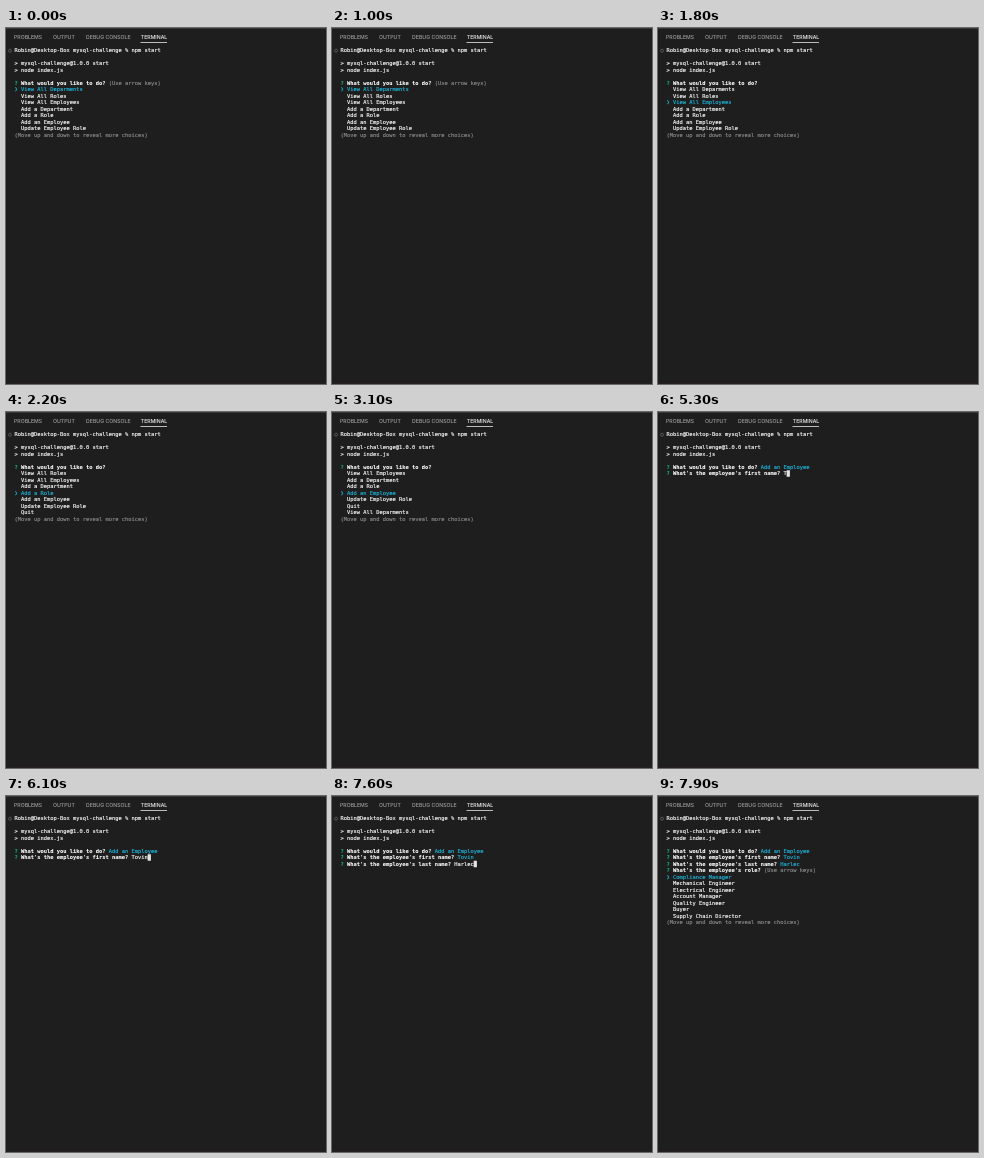
These frames come from a looping animation (320 by 356 pixels, 8 s). An HTML page with a canvas:

```html
<!DOCTYPE html>
<html lang="en">
<head>
<meta charset="utf-8">
<title>Terminal session</title>
<style>
  html, body { margin: 0; width: 100%; height: 100%; overflow: hidden; background: #1e1e1e; }
  canvas { display: block; width: 320px; height: 356px; }
</style>
</head>
<body>
<canvas id="stage"></canvas>
<script>
const W = 320, H = 356, LOOP = 8000;
const LEFT = 8.4, CELL = 3.25, LINE = 6.5, FIRST_BASE = 24.25;
const MONO = '"DejaVu Sans Mono", monospace';
const SANS = 'Inter, sans-serif';
const COLOR = {
  back: '#1e1e1e', text: '#f4f4f4', bright: '#ffffff', dim: '#858585',
  cyan: '#1cb0d4', green: '#10bd7d', tab: '#a0a0a0'
};

const ACTIONS = ['View All Deparments', 'View All Roles', 'View All Employees',
  'Add a Department', 'Add a Role', 'Add an Employee', 'Update Employee Role', 'Quit'];
const ROLES = ['Compliance Manager', 'Mechanical Engineer', 'Electrical Engineer',
  'Account Manager', 'Quality Engineer', 'Buyer', 'Supply Chain Director'];
const PAGE = 7, MIDDLE = 3;

// Key press times in ms
const DOWN = [1500, 1800, 2000, 2200, 2400];
const CHOSEN = 4000, FIRST_DONE = 6200, LAST_DONE = 7800;
const FIRST = { text: 'Tovin', keys: [5300, 5500, 5600, 5600, 5700] };
const LAST = { text: 'Harlec', keys: [6900, 7000, 7100, 7200, 7200, 7300] };

const canvas = document.getElementById('stage');
const ctx = canvas.getContext('2d');
const ratio = window.devicePixelRatio || 1;
canvas.width = W * ratio;
canvas.height = H * ratio;

const pressed = (keys, t) => keys.filter(k => k <= t).length;

// Text is set large and scaled down to keep fractional glyph widths;
// a fine outline thickens the strokes.
function label(text, x, y, size, family, color, weight, outline) {
  ctx.save();
  ctx.translate(x, y);
  ctx.scale(0.1, 0.1);
  ctx.font = `${weight} ${size * 10}px ${family}`;
  ctx.fillStyle = ctx.strokeStyle = color;
  ctx.lineWidth = outline * 10;
  ctx.lineJoin = 'round';
  ctx.fillText(text, 0, 0);
  ctx.strokeText(text, 0, 0);
  ctx.restore();
}

function write(row, col, text, color = COLOR.text, weight = 400) {
  const outline = weight > 400 ? 0.08 : 0.18;
  label(text, LEFT + col * CELL, FIRST_BASE + row * LINE, 5.4, MONO, color, weight, outline);
}

function drawCursor(row, col) {
  ctx.fillStyle = '#e4e4e4';
  ctx.fillRect(LEFT + col * CELL, FIRST_BASE + row * LINE - 5, CELL, LINE);
}

function drawQuestion(row, question, reply = '', color = COLOR.cyan) {
  write(row, 0, '?', COLOR.green);
  write(row, 2, question, COLOR.bright, 700);
  write(row, question.length + 3, reply, color);
}

function drawInput(row, question, { text, keys }, t) {
  const typed = text.slice(0, pressed(keys, t));
  drawQuestion(row, question, typed, COLOR.text);
  drawCursor(row, question.length + 3 + typed.length);
}

function drawList(row, choices, active) {
  const pointer = Math.min(active, MIDDLE);
  for (let i = 0; i < PAGE; i++) {
    const choice = choices[(active - pointer + i) % choices.length];
    const selected = i === pointer;
    if (selected) write(row + i, 0, '❯', COLOR.cyan);
    write(row + i, 2, choice, selected ? COLOR.cyan : COLOR.text);
  }
  write(row + PAGE, 0, '(Move up and down to reveal more choices)', COLOR.dim);
}

function drawPanel() {
  ctx.fillStyle = COLOR.back;
  ctx.fillRect(0, 0, W, H);
  ctx.fillStyle = '#383838';
  ctx.fillRect(0, 0, W, 1);
  ctx.fillStyle = '#261f25';
  ctx.fillRect(0, H - 1, W, 1);

  const tabs = [['PROBLEMS', 8], ['OUTPUT', 47], ['DEBUG CONSOLE', 80], ['TERMINAL', 134.8]];
  for (const [name, x] of tabs) {
    const color = name === 'TERMINAL' ? '#f0f0f0' : COLOR.tab;
    label(name, x, 11.3, 5.2, SANS, color, 400, 0.1);
  }
  ctx.fillStyle = '#bcbcbc';
  ctx.fillRect(134.5, 14, 26.5, 1);

  ctx.strokeStyle = '#777777';
  ctx.lineWidth = 0.6;
  ctx.beginPath();
  ctx.arc(4, 22.7, 1.5, 0, Math.PI * 2);
  ctx.stroke();

  write(0, 0, 'Robin@Desktop-Box mysql-challenge % npm start');
  write(2, 0, '> mysql-challenge@1.0.0 start');
  write(3, 0, '> node index.js');
}

function draw(t) {
  const task = 'What would you like to do?';
  const firstName = "What's the employee's first name?";
  const lastName = "What's the employee's last name?";
  const hint = '(Use arrow keys)';

  ctx.setTransform(ratio, 0, 0, ratio, 0, 0);
  drawPanel();

  if (t < CHOSEN) {
    const active = pressed(DOWN, t);
    drawQuestion(5, task, active ? '' : hint, COLOR.dim);
    drawList(6, ACTIONS, active);
    return;
  }
  drawQuestion(5, task, 'Add an Employee');

  if (t < FIRST_DONE) {
    drawInput(6, firstName, FIRST, t);
    return;
  }
  drawQuestion(6, firstName, FIRST.text);

  if (t < LAST_DONE) {
    drawInput(7, lastName, LAST, t);
    return;
  }
  drawQuestion(7, lastName, LAST.text);
  drawQuestion(8, "What's the employee's role?", hint, COLOR.dim);
  drawList(9, ROLES, 0);
}

const start = performance.now();
function frame() {
  draw((performance.now() - start) % LOOP);
  requestAnimationFrame(frame);
}
frame();
</script>
</body>
</html>
```
